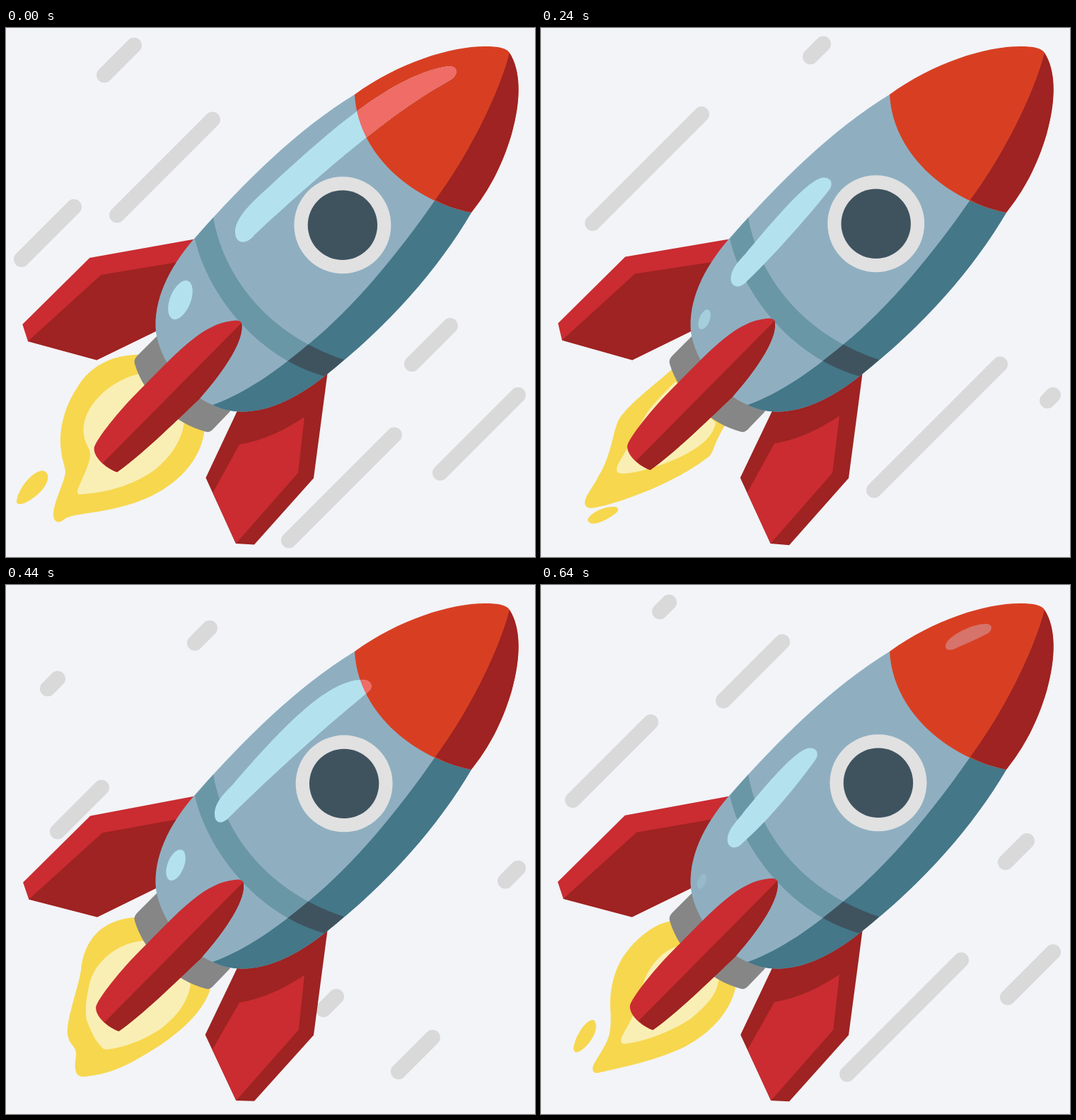
These frames come from a looping animation (748x748 px, 0.68 s). An HTML page with a canvas:

```html
<!DOCTYPE html>
<html lang="en">
<head>
<meta charset="utf-8">
<title>Rocket</title>
<style>
html, body { margin: 0; width: 100%; height: 100%; overflow: hidden; background: #f2f4f8; }
canvas { display: block; width: 748px; height: 748px; }
</style>
</head>
<body>
<canvas id="stage" width="748" height="748"></canvas>
<script>
const ctx = document.getElementById('stage').getContext('2d');
const LOOP = 680, CYCLE = 340, STEP = 40;
const RED = '#ca2c31', DARK = '#9e2322', SLATE = '#3f535f', SHINE = '#b3e2ee', YELLOW = '#f7d74e';

const clamp = v => Math.max(0, Math.min(1, v));

// Find the two keys around time t and the fraction between them
function span(keys, t) {
  let i = 0;
  while (i < keys.length - 2 && t >= keys[i + 1][0]) i++;
  const a = keys[i], b = keys[i + 1];
  return [a, b, clamp((t - a[0]) / (b[0] - a[0]))];
}

// Blend two path strings of the same structure
function morph(keys, t) {
  const [a, b, k] = span(keys, t);
  const to = b[1].match(/\d+/g);
  let n = 0;
  return a[1].replace(/\d+/g, v => (+v + (to[n++] - v) * k).toFixed(2));
}

function fill(d, color) {
  ctx.fillStyle = color;
  ctx.fill(new Path2D(d));
}

// Speed lines lie on x + y = sum; keys are [time, head x, tail x]
const streaks = [
  { sum: 205.5, keys: [[285,181,181],[300,181,168],[320,181,150],[340,181,139],[420,97,77],[440,73,59],[480,38,38]] },
  { sum: 349, keys: [[70,298,298],[80,293,282],[100,288,267],[220,242,105],[240,227,73],[300,155,45],[320,119,31],[340,96,22],[420,27,23],[432,24,24]] },
  { sum: 421.5, keys: [[232,406,400],[240,399,381],[300,341,258],[320,311,196],[340,292,157],[420,171,92],[440,135,73],[490,58,54]] },
  { sum: 1124.5, keys: [[75,729,729],[80,729,724],[100,724,706],[220,666,510],[240,649,471],[300,594,433],[320,567,412],[340,549,400],[420,407,403],[432,404,404]] },
  { sum: 1243, keys: [[232,724,724],[240,724,716],[300,724,660],[320,724,631],[340,724,614],[420,629,568],[440,603,555],[485,542,536]] },
  { sum: 1049, keys: [[275,706,703],[300,687,657],[320,654,611],[340,628,574],[420,493,468],[440,467,449],[485,420,420]] }
];

const outer0 = 'M190 462C148 461 116 481 101 508C82 536 74 570 78 598C79 610 83 618 84 627C84 640 67 670 67 688C67 698 74 702 82 695C95 684 150 688 205 662C250 640 278 605 281 565Z';
const outerFlame = [
  [0, outer0],
  [80, 'M185 469C136 472 108 502 103 548C100 570 83 620 84 642C85 658 95 660 95 670C96 676 94 682 95 688C97 695 103 695 108 694C135 692 172 681 197 663C240 632 275 602 285 572Z'],
  [100, 'M183 470C135 473 110 502 106 545C102 570 85 615 87 635C89 650 99 652 99 662C99 670 97 676 98 684C99 695 106 696 113 695C140 692 165 683 188 669C235 643 278 608 289 571Z'],
  [220, 'M188 486C148 496 122 514 110 546C103 562 96 590 86 612C82 625 78 632 73 638C66 648 54 660 53 668C54 674 61 673 66 672C100 664 170 645 215 622C225 614 250 608 265 563Z'],
  [240, 'M186 482C160 505 125 531 111 552C104 563 101 590 92 612C87 625 82 632 78 640C70 654 61 664 62 673C64 680 71 679 77 678C115 671 190 642 232 610C246 602 240 595 260 562Z'],
  [300, 'M186 475C158 478 128 505 113 531C102 550 97 575 98 598C99 610 99 622 97 634C92 655 73 675 73 684C73 690 78 691 84 689C115 682 165 672 205 652C245 630 268 600 275 570Z'],
  [320, 'M186 468C148 468 116 490 101 518C89 542 84 570 87 594C89 605 89 608 89 615C88 640 70 675 70 686C70 695 78 695 84 692C105 682 160 677 205 656C245 638 274 605 277 568Z'],
  [340, outer0]
];

const inner0 = 'M194 488C150 495 105 535 110 575C112 590 120 595 119 604C118 620 103 645 101 655C101 660 104 660 110 659C150 656 185 643 210 625C235 605 250 580 252 556Z';
const innerFlame = [
  [0, inner0],
  [80, 'M193 498C150 505 125 540 119 570C115 590 113 615 117 630C120 642 124 650 127 655C130 659 134 658 140 657C170 652 200 638 217 625C240 606 256 588 260 562Z'],
  [100, 'M193 503C156 507 128 532 119 560C114 580 111 600 114 615C120 632 127 645 134 652C138 658 142 657 148 656C175 652 205 638 222 625C243 608 258 588 261 564Z'],
  [220, 'M197 508C168 513 138 528 129 548C121 562 116 580 109 594C107 603 103 608 103 614C104 620 108 620 114 620C140 621 165 612 190 600C225 582 240 574 247 558Z'],
  [240, 'M190 500C175 515 160 530 150 544C140 560 125 590 117 603C112 612 107 618 107 625C108 630 112 630 118 630C145 628 180 615 200 605C230 590 244 575 247 558Z'],
  [300, 'M197 510C170 515 148 545 143 570C140 590 132 605 127 615C121 628 113 637 113 645C114 650 118 649 124 648C155 644 195 625 212 613C238 592 250 575 251 558Z'],
  [320, 'M195 497C155 502 120 545 125 578C126 590 126 595 124 606C121 622 109 638 107 650C107 656 111 655 117 654C150 650 190 635 211 620C236 600 250 580 251 558Z'],
  [340, inner0]
];

const sparks = [
  [
    [270, 'M70 640C72 630 82 610 88 606C92 606 94 615 90 620C84 634 72 650 70 640Z'],
    [300, 'M46 656C47 640 63 614 74 615C79 618 79 628 75 636C66 655 47 668 46 656Z'],
    [320, 'M27 667C28 650 48 622 60 622C67 624 67 633 65 639C58 656 30 675 27 667Z'],
    [340, 'M15 671C15 655 36 626 52 626C60 627 61 636 57 644C50 660 20 680 15 671Z'],
    [380, 'M9 677C9 670 18 655 26 655C32 655 32 660 30 664C24 674 10 682 9 677Z'],
    [400, 'M9 679C9 678 10 677 11 677C12 677 12 678 12 678C11 680 10 680 9 679Z']
  ],
  [
    [185, 'M85 688C95 672 125 655 150 650C165 648 160 658 150 665C130 682 85 700 85 688Z'],
    [220, 'M73 691C76 680 105 663 130 664C138 665 136 672 128 678C110 692 74 704 73 691Z'],
    [240, 'M66 695C70 685 90 676 104 677C112 678 110 684 103 688C90 698 68 707 66 695Z'],
    [275, 'M64 703C65 702 67 701 68 701C69 701 69 702 68 703C67 704 65 705 64 703Z']
  ]
];

const gloss = [
  [0, 'M324 288C324 272 340 255 352 243C440 162 540 66 626 54C640 54 640 66 629 73C600 91 540 118 351 293C340 307 324 306 324 288Z'],
  [80, 'M302 316C302 300 314 287 327 275C398 197 476 115 530 115C546 115 547 128 538 134C522 147 463 189 326 317C314 332 302 332 302 316Z'],
  [100, 'M295 324C295 308 308 295 320 283C388 204 454 134 503 134C518 134 520 145 512 151C497 165 442 206 318 326C306 340 295 338 295 324Z'],
  [220, 'M270 352C270 340 280 328 292 316C335 265 385 206 406 205C420 205 419 217 414 223C392 250 335 315 293 356C284 367 270 366 270 352Z'],
  [320, 'M262 362C262 350 273 338 282 327C318 282 356 238 373 237C386 237 386 248 381 254C361 283 321 335 284 366C275 377 262 375 262 362Z']
];

const noseArc = 'C497 175 570 243 658 261';
const noseSide = 'C728 60 729 100 715 150C701 197 682 231 658 261';
const nose = 'M712 35' + noseSide + 'C570 243 497 175 493 94C556 48 632 25 680 26C700 26 709 30 712 35Z';
const noseShade = 'M712 35' + noseSide + 'Q630 256 607 243C650 185 695 100 712 35Z';
const belly = 'C346 559 408 527 452 491C541 421 611 341 658 261';
const hull = 'M493 94C410 145 340 215 265 299C230 340 208 385 212 430C218 470 250 515 292 533' + belly + 'Z';
const hullShade = 'M607 243C555 318 492 395 428 447C385 483 340 516 292 533' + belly + 'Q630 256 607 243Z';
const band = 'M293 267C305 340 360 430 478 469L452 493C350 465 283 370 267 298Z';
const nozzle = 'M213 436L186 463Q180 469 182 475C195 520 240 560 283 571Q289 572 293 567L317 542L270 480Z';

function clipped(d, paint) {
  ctx.save();
  ctx.clip(new Path2D(d));
  paint();
  ctx.restore();
}

function drawStreaks(p) {
  ctx.strokeStyle = '#d9d9d9';
  ctx.lineWidth = 22;
  ctx.lineCap = 'round';
  for (const { sum, keys } of streaks) {
    const start = keys[0][0], end = keys[keys.length - 1][0];
    for (const t of [p, p + CYCLE]) {
      if (t < start || t >= end) continue;
      const [a, b, k] = span(keys, t);
      const head = a[1] + (b[1] - a[1]) * k, tail = a[2] + (b[2] - a[2]) * k;
      ctx.globalAlpha = clamp((end - t) / 40);
      ctx.beginPath();
      ctx.moveTo(head, sum - head);
      ctx.lineTo(tail - 0.01, sum - tail);
      ctx.stroke();
    }
  }
  ctx.globalAlpha = 1;
}

function drawFlame(p) {
  fill(morph(outerFlame, p), YELLOW);
  fill(morph(innerFlame, p), '#f9efb4');
  for (const keys of sparks) {
    for (const t of [p, p + CYCLE]) {
      if (t >= keys[0][0] && t < keys[keys.length - 1][0]) fill(morph(keys, t), YELLOW);
    }
  }
}

function drawSideFins(w) {
  const x = 118.3 + Math.abs(w), y = 1.8 * w;
  fill(`M275 297L${x} ${325 + y}L${x - 95} ${419 + y}L${31 + 1.6 * w} ${443 + y}L${x + 10} 469.5L230 420Z`, RED);
  fill(`M${31 + 1.6 * w} ${443 + y}L${134.5 + 2 * w} ${349 + y}L255 329L230 420L${x + 10} 469.5Z`, DARK);

  const left = 282.5 - Math.abs(w);
  fill(`M330 535L${left} 636L${325 + w / 2} 729L351 ${730.5 - w}L435 636.5L455 485Z`, DARK);
  fill(`M${left + 10} 657L330 ${589 + y}C365 ${583 + y} 395 ${568 + y} 422 ${550 + y}L${413 + w} 629L${325 + w / 2} 729Z`, RED);
}

function drawHull() {
  fill(nozzle, '#868686');
  fill(hull, '#8fafc1');
  clipped(hull, () => fill(band, '#6a97a6'));
  fill(hullShade, '#447788');
  clipped(hullShade, () => fill(band, SLATE));
  fill(nose, '#d83f22');
  clipped(nose, () => fill(noseShade, DARK));
}

function drawGloss(p) {
  const shape = morph(gloss, p);
  fill(shape, SHINE);
  clipped(nose, () => fill(shape, '#ef6c67'));

  // Next gloss fading in at the nose
  if (p > 250) {
    const s = 0.844 + (p - 300) * 0.0078;
    ctx.save();
    ctx.globalAlpha = clamp((p - 250) / 50);
    ctx.translate(637, 55);
    ctx.scale(s, s);
    ctx.translate(-637, -55);
    fill('M560 92C560 78 600 56 626 55C640 54 640 66 629 72C610 82 590 90 575 97C566 100 560 99 560 92Z', '#d6736a');
    ctx.restore();
  }

  const s = 1 - p * 0.00205;
  ctx.globalAlpha = clamp(1 - (p - 180) / 155);
  ctx.fillStyle = SHINE;
  ctx.beginPath();
  ctx.ellipse(246.5 - p * 0.064, 384.5 + p * 0.115, 14.6 * s, 29 * s, 0.38, 0, 7);
  ctx.fill();
  ctx.globalAlpha = 1;
}

function disc(x, y, r, color) {
  ctx.fillStyle = color;
  ctx.beginPath();
  ctx.arc(x, y, r, 0, 7);
  ctx.fill();
}

function drawWindow(w) {
  const x = 475.9 + 2.8 * w, y = 278.8 + 2.6 * w;
  disc(x, y, 68.5, '#e1e1e1');
  disc(x, y, 49.2, SLATE);
}

function drawMiddleFin(w) {
  const edge = 'C190 605 235 561 273 525C310 483 338 440 333 417Z';
  ctx.save();
  ctx.translate(3.2 * w, 3.8 * w);
  fill('M333 417Q330 412 320 414C280 418 245 455 196 505C165 535 132 575 125 592C122 602 135 620 157 628' + edge, RED);
  fill('M333 417L137 615Q146 624 157 628' + edge, DARK);
  ctx.restore();
}

function draw(time) {
  const t = Math.floor(time / STEP) * STEP % LOOP;
  const p = t % CYCLE;
  const w = -Math.sin(t / LOOP * Math.PI * 2);
  ctx.fillStyle = '#f2f4f8';
  ctx.fillRect(0, 0, 748, 748);
  drawStreaks(p);
  drawFlame(p);
  drawSideFins(w);
  drawHull();
  drawGloss(p);
  drawWindow(w);
  drawMiddleFin(w);
}

const start = performance.now();
function tick() {
  draw(performance.now() - start);
  requestAnimationFrame(tick);
}
tick();
</script>
</body>
</html>
```
